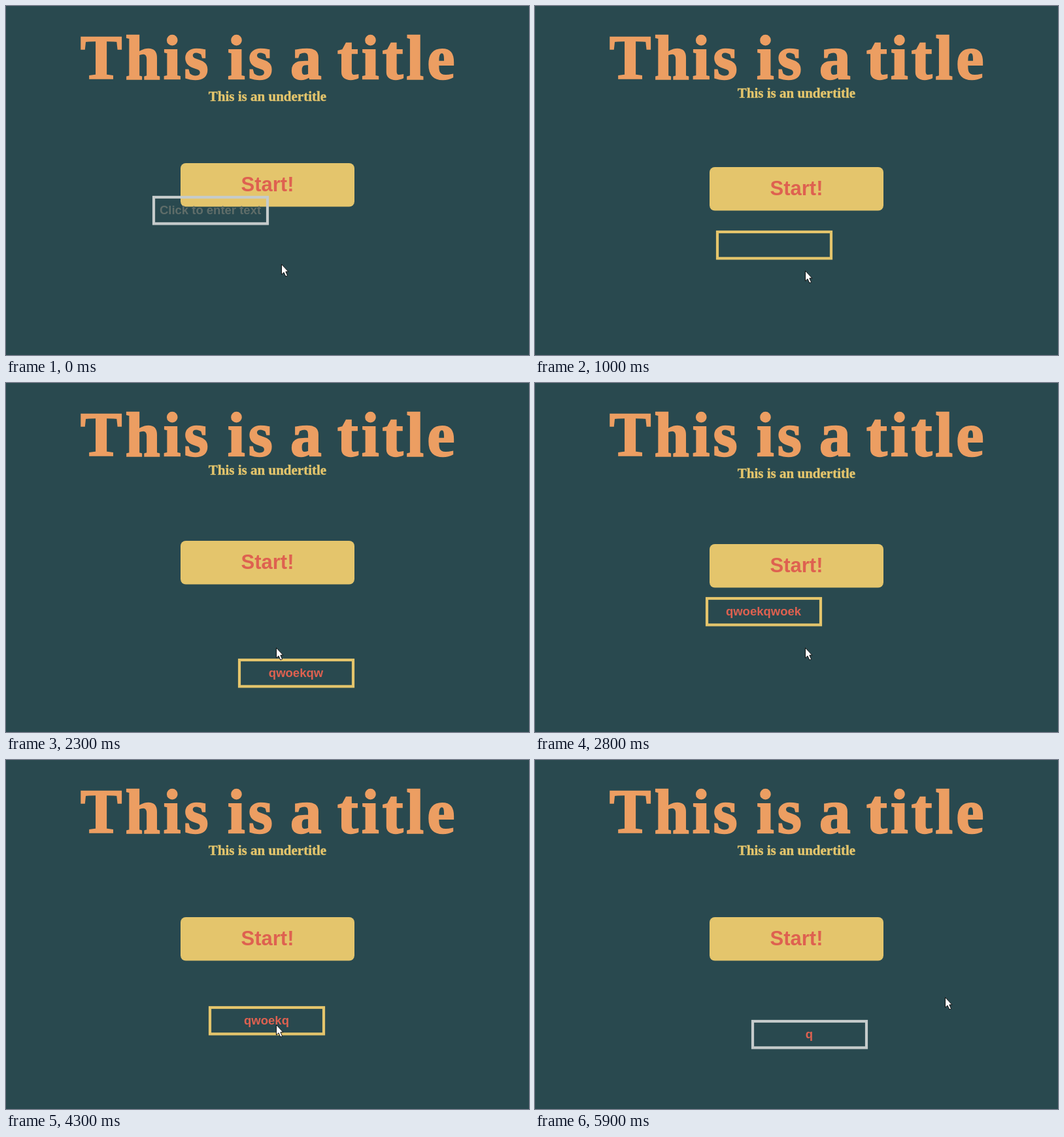
Write an HTML page that moves like this. It is 800 px wide and 533 px high and loops after 6 s.

```html
<!DOCTYPE html>
<html lang="en">
<head>
<meta charset="utf-8">
<title>Menu</title>
<style>
  html, body { margin: 0; width: 100%; height: 100%; overflow: hidden; background: #29494f; }
  svg { display: block; width: 100vw; height: 100vh; }
  .serif { font-family: "Liberation Serif", "Times New Roman", serif; font-weight: bold; }
  .sans { font-family: "Liberation Sans", Arial, sans-serif; font-weight: bold; text-anchor: middle; fill: #de6150; }
  .title { font-size: 95px; letter-spacing: 5.3px; fill: #ec9e62; stroke: #ec9e62; stroke-width: 2.4px; }
  .sub { font-size: 21px; fill: #e4c56c; stroke: #e4c56c; stroke-width: .4px; text-anchor: middle; }
</style>
</head>
<body>
<svg viewBox="0 0 800 533">
  <text class="serif title" y="111"><tspan x="114">This</tspan><tspan x="339">is</tspan><tspan x="435">a</tspan><tspan x="507">title</tspan></text>
  <text id="sub" class="serif sub" x="400">This is an undertitle</text>
  <g id="button">
    <rect x="267" width="266" height="66.5" rx="8" fill="#e4c56c"/>
    <text class="sans" x="400" y="43" font-size="31">Start!</text>
  </g>
  <g id="field">
    <rect id="frame" x="2" y="2" width="174" height="40.4" fill="none" stroke-width="4.2"/>
    <text id="value" class="sans" x="88.5" y="28" font-size="18.5"></text>
  </g>
  <path id="cursor" d="M.5 .5V16L4 12.8L6.8 19L9.6 17.8L6.9 11.8H11Z" fill="#fff" stroke="#111"/>
</svg>
<script>
const LOOP = 6, FPS = 10;
const FOCUS = 0.3, BLUR = 5.7;
const TYPE = 1.55, ERASE = 3.55;
const WORD = "qwoekqwoek", HINT = "Click to enter text";

// The scene runs at a slightly uneven pace: [seconds, swing angle in degrees]
const pace = [[0, -26], [1, 172], [1.8, 346], [2.8, 542], [3.7, 733], [5, 1029], [5.9, 1213]];

const $ = id => document.getElementById(id);
const clamp = (v, lo, hi) => Math.min(hi, Math.max(lo, v));
const progress = (t, from, to) => clamp((t - from) / (to - from), 0, 1);
const easeOut = p => 1 - (1 - p) ** 3;

function swingAngle(t) {
  const i = Math.max(1, pace.findIndex(([time]) => time >= t));
  const [t0, a0] = pace[i - 1], [t1, a1] = pace[i];
  return a0 + (a1 - a0) * progress(t, t0, t1);
}

function typed(t) {
  if (t < TYPE) return "";
  const added = Math.min(WORD.length, Math.floor((t - TYPE) * 10));
  const erased = Math.max(0, Math.ceil((t - ERASE) * 5));
  return WORD.slice(0, Math.max(1, added - erased));
}

function move(id, x, y) {
  $(id).setAttribute("transform", `translate(${Math.round(x)} ${Math.round(y)})`);
}

function render(t) {
  const angle = swingAngle(t);
  const x = 264 + 91.5 * Math.sin(angle * Math.PI / 180);
  move("field", x, x + 66);

  const clock = (angle + 26) / 210;
  move("button", 0, 242.5 + 3.7 * Math.cos((clock - 0.75) / 2.15 * 2 * Math.PI));

  const raised = Math.floor((clock + 0.3) / 0.7) % 2;
  $("sub").setAttribute("y", raised ? 140 : 145);

  const hint = t < FOCUS;
  $("frame").setAttribute("stroke", hint || t >= BLUR ? "#c5cbcb" : "#e4c56c");
  $("value").textContent = hint ? HINT : typed(t);
  $("value").style.fill = hint ? "#5f6d69" : "";

  const settle = progress(t, 0, 1), leave = easeOut(progress(t, 5.1, 5.8));
  move("cursor", 421 - 8 * settle + 214 * leave, 394 + 10 * settle - 42 * leave);
}

const start = performance.now();
function tick() {
  const t = (performance.now() - start) / 1000 % LOOP;
  render(Math.floor(t * FPS + 1e-6) / FPS);
  requestAnimationFrame(tick);
}
tick();
</script>
</body>
</html>
```
